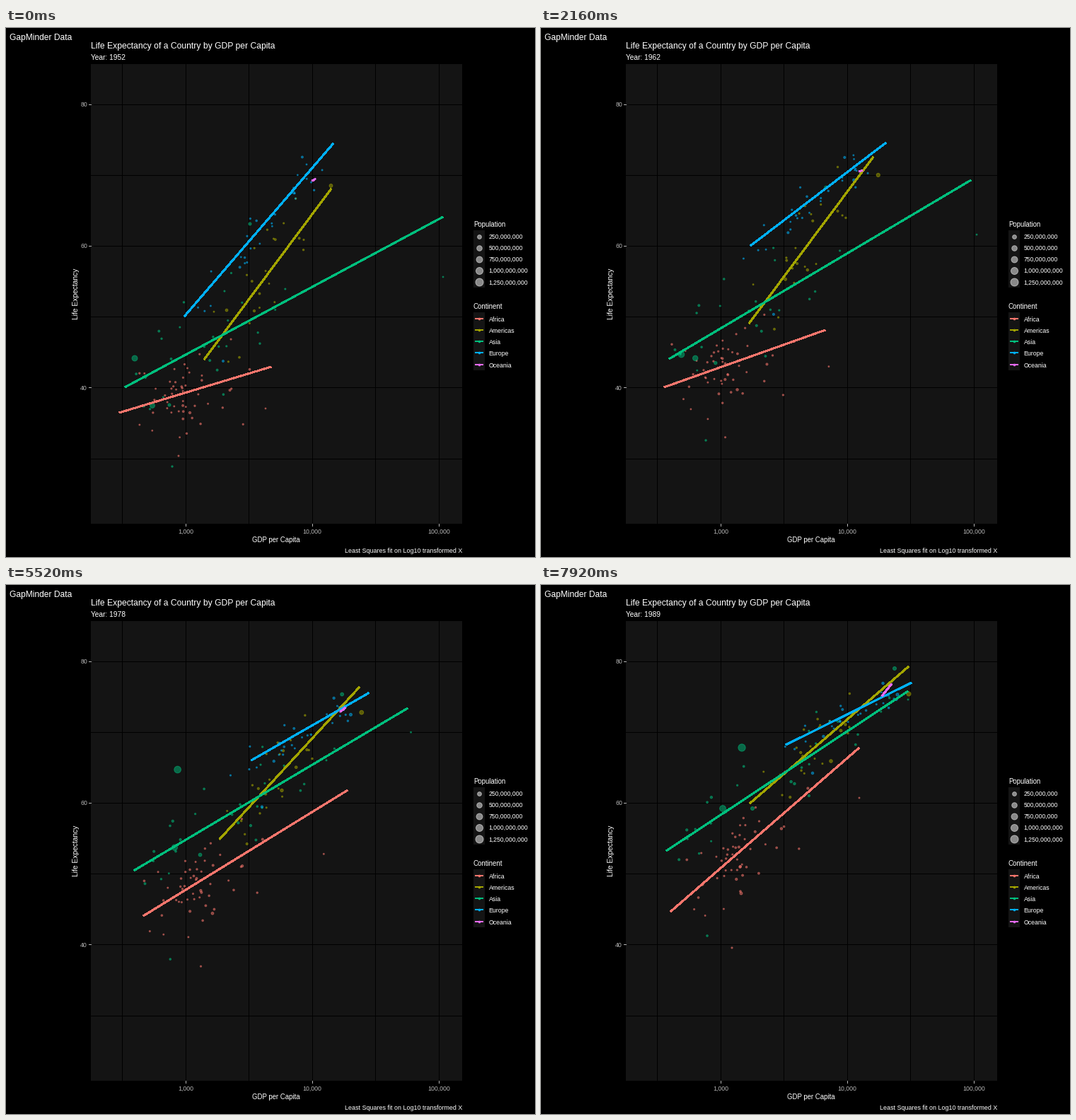
Write a matplotlib script that moves like this. It is 748 px wide and 748 px high and loops after 8000 ms.

```python
import numpy as np
import matplotlib.pyplot as plt
from matplotlib.animation import FuncAnimation
from matplotlib.collections import LineCollection
from matplotlib.colors import to_rgba
from matplotlib.patches import Rectangle

SIZE, DPI = 748, 88
PT = 72 / DPI                      # points per pixel
STEPS, TICK, HOLD = 67, 40, 3      # each step is held for three ticks
STEP = np.arange(STEPS)
KEYS = np.arange(9) * 9            # one key every five years

plt.rcParams["font.family"] = "Liberation Sans"

COLORS = {"Africa": "#F8766D", "Americas": "#A3A500", "Asia": "#00BF7D",
          "Europe": "#00B0F6", "Oceania": "#E76BF3"}

# Fitted lines at a few steps: left x, left y, right x, right y
FIT_KEYS = (0, 18, 27, 36, 54, 66)
FITS = {
    "Africa": [(160, 544, 375, 479), (174, 508, 402, 427), (185, 490, 482, 374),
               (194, 478, 491, 332), (194, 460, 476, 257), (183, 462, 450, 230)],
    "Americas": [(280, 469, 460, 227), (294, 418, 470, 182), (283, 405, 485, 179),
                 (293, 384, 494, 165), (309, 340, 504, 128), (295, 309, 520, 115)],
    "Asia": [(168, 508, 618, 267), (181, 468, 608, 215), (172, 447, 596, 201),
             (174, 428, 619, 172), (187, 384, 527, 176), (177, 376, 519, 150)],
    "Europe": [(252, 408, 463, 163), (296, 308, 488, 162), (314, 287, 498, 159),
               (336, 262, 511, 158), (355, 237, 515, 148), (346, 226, 524, 138)],
}

# Countries that stand out: millions of people, then x, y at three steps
MARK_KEYS = (0, 37, 66)
MARKS = {
    "Africa": [(40, 260, 544, 296, 477, 283, 436),
               (1, 367, 538, 449, 416, 450, 301),
               (3, 244, 605, 278, 551, 270, 513)],
    "Americas": [(150, 459.5, 223, 495, 192, 520, 154),
                 (65, 312, 399, 381, 309, 410, 249),
                 (38, 351, 400, 404, 281, 424, 206)],
    "Asia": [(560, 182, 467, 224, 275, 284, 230),
             (1, 618, 352, 614, 229, 519, 162),
             (380, 207, 534, 230, 396, 257, 316),
             (86, 345, 277, 464, 171, 500, 118),
             (85, 231, 533, 263.5, 411, 299, 316),
             (9, 235, 620, 231, 544, 235, 496)],
    "Europe": [(26, 307, 471, 352, 335, 384, 266),
               (50, 407, 233, 480, 196, 504, 155)],
    "Oceania": [(8, 433, 216, 468.5, 189, 482, 157),
                (2, 437.5, 213.5, 473, 188.5, 495.6, 140)],
}

# Remaining countries: count, beta shape, x range first and last, spread first and last
CROWDS = {
    "Africa": (49, (1.4, 2.4), (163, 375), (190, 410), (35, 37)),
    "Americas": (22, (1.6, 1.8), (285, 440), (308, 455), (42, 24)),
    "Asia": (27, (1.2, 1.8), (180, 400), (190, 515), (46, 28)),
    "Europe": (28, (2.3, 1.5), (258, 455), (350, 524), (17, 9)),
}


def over_steps(keys, rows):
    """Interpolate each column of rows linearly to every step."""
    rows = np.asarray(rows, float)
    return np.column_stack([np.interp(STEP, keys, col) for col in rows.T])


def bump(center, width=9):
    return np.maximum(0, 1 - abs(STEP - center) / width)


def diameter(millions):
    return 1.6 + 9.6 * np.sqrt(millions / 1300)


def crowd(rng, fit, count, shape, first, last, spread):
    """Points scattered about a fitted line, drifting with it."""
    t = (KEYS / KEYS[-1])[:, None]
    u = rng.beta(*shape, count)
    x = (first[0] + u * (first[1] - first[0])) * (1 - t)
    x += (last[0] + u * (last[1] - last[0])) * t
    x += rng.normal(0, 4, (len(KEYS), count))
    off = np.clip(rng.normal(0, 1, count), -1.9, 1.9)
    off = off * (spread[0] * (1 - t) + spread[1] * t)
    off += rng.normal(0, 3, (len(KEYS), count))
    x, off = over_steps(KEYS, x), over_steps(KEYS, off)
    x0, y0, x1, y1 = (fit[:, [i]] for i in range(4))
    return x, y0 + (x - x0) * (y1 - y0) / (x1 - x0) + off


rng = np.random.default_rng(1952)
growth = 1 + 0.9 * STEP[:, None] / STEP[-1]
fits = {name: over_steps(FIT_KEYS, rows) for name, rows in FITS.items()}
xs, ys, pops, tints = [], [], [], []


def add_points(name, x, y, people):
    xs.append(x)
    ys.append(y)
    pops.append(np.asarray(people) * growth)
    tints.extend([to_rgba(COLORS[name], 0.5)] * x.shape[1])


for name, spec in CROWDS.items():
    add_points(name, *crowd(rng, fits[name], *spec),
               np.clip(rng.lognormal(1.6, 0.9, spec[0]), 0.5, 25))

for name, rows in MARKS.items():
    rows = np.array(rows, float)
    x = over_steps(MARK_KEYS, rows[:, 1::2].T)
    y = over_steps(MARK_KEYS, rows[:, 2::2].T)
    if name == "Asia":
        # famine around 1962, then an oil slump in the early eighties
        x[:, 0] += 19 * bump(9) - 4 * bump(18)
        y[:, 0] += 88 * bump(18) - 19 * bump(9)
        x[:, 1] -= 36 * bump(54, 12)
    if name == "Oceania":
        fits[name] = np.column_stack([x[:, 0], y[:, 0], x[:, 1], y[:, 1]])
    add_points(name, x, y, rows[:, 0])

xs, ys = np.hstack(xs), np.hstack(ys)
areas = (diameter(np.hstack(pops)) * PT) ** 2

fig = plt.figure(figsize=(SIZE / DPI, SIZE / DPI), dpi=DPI, facecolor="black")
ax = fig.add_axes([0, 0, 1, 1])
ax.set_xlim(0, SIZE)
ax.set_ylim(SIZE, 0)
ax.axis("off")


def label(x, y, s, px, color="white", ha="left", **kw):
    kw.setdefault("va", "baseline")
    return ax.text(x, y, s, fontsize=px * PT, color=color, ha=ha, **kw)


def box(x, y, w, h):
    ax.add_patch(Rectangle((x, y), w, h, fc="#141414", lw=0, zorder=0))


def strokes(segments, color, width, z):
    lines = LineCollection(segments, colors=color, linewidths=width * PT,
                           antialiaseds=False, zorder=z)
    return ax.add_collection(lines, autolim=False)


def dots(x, y, area, color):
    return ax.scatter(x, y, s=area, facecolors=color, edgecolors=color,
                      linewidths=PT, zorder=2)


# Panel, grid and axes
GREY = "#b3b3b3"
box(120, 51, 525, 650)
cols = 164.5 + 89.5 * np.arange(6)
rows = 107.5 + 100.2 * np.arange(6)
strokes([[(x, 51), (x, 701)] for x in cols] + [[(120, y), (645, y)] for y in rows],
        "black", 1, 1)
strokes([[(x, 701), (x, 704)] for x in cols[1::2]]
        + [[(117, y), (120, y)] for y in rows[:5:2]], GREY, 1, 1)
for x, s in zip(cols[1::2], ("1,000", "10,000", "100,000")):
    label(x, 715, s, 8.8, GREY, "center")
for y, s in zip(rows[::2], ("80", "60", "40")):
    label(115, y + 3.5, s, 8.8, GREY, "right")

label(5, 17, "GapMinder Data", 12)
label(120, 29, "Life Expectancy of a Country by GDP per Capita", 12.15)
year = label(120, 45, "", 10.2)
label(382, 727, "GDP per Capita", 9.7, ha="center")
label(99, 376, "Life Expectancy", 10.2, ha="center", va="center", rotation=90)
label(645, 742, "Least Squares fit on Log10 transformed X", 8.85, ha="right")

# Legends
label(661, 281, "Population", 9.7)
box(661, 286, 16, 81)
for i in range(5):
    y, people = 294.5 + 16.1 * i, 250 * (i + 1)
    dots([669], [y], (diameter(people) * PT) ** 2, [to_rgba("white", 0.5)])
    label(682.5, y + 3.5, f"{people * 10**6:,}", 8.65)
label(661, 397, "Continent", 9.8)
box(661, 402, 16, 82)
for i, (name, color) in enumerate(COLORS.items()):
    y = 410.5 + 16.3 * i
    strokes([[(663, y), (675, y)]], color, 2, 3)
    dots([669], [y], (2.6 * PT) ** 2, [color])
    label(682.5, y + 4, name, 8.75)

points = dots(xs[0], ys[0], areas[0], tints)
trends = strokes([np.zeros((2, 2))] * len(fits), list(COLORS.values()), 2, 3)


def draw(tick):
    k = min(tick // HOLD, STEPS - 1)
    points.set_offsets(np.column_stack([xs[k], ys[k]]))
    points.set_sizes(areas[k], DPI)
    trends.set_segments([fits[name][k].reshape(2, 2) for name in COLORS])
    year.set_text(f"Year: {round(1952 + k * 5 / 9)}")
    return points, trends, year


anim = FuncAnimation(fig, draw, frames=200, interval=TICK,
                     init_func=lambda: draw(0), repeat=True, repeat_delay=0)
plt.show()
```
